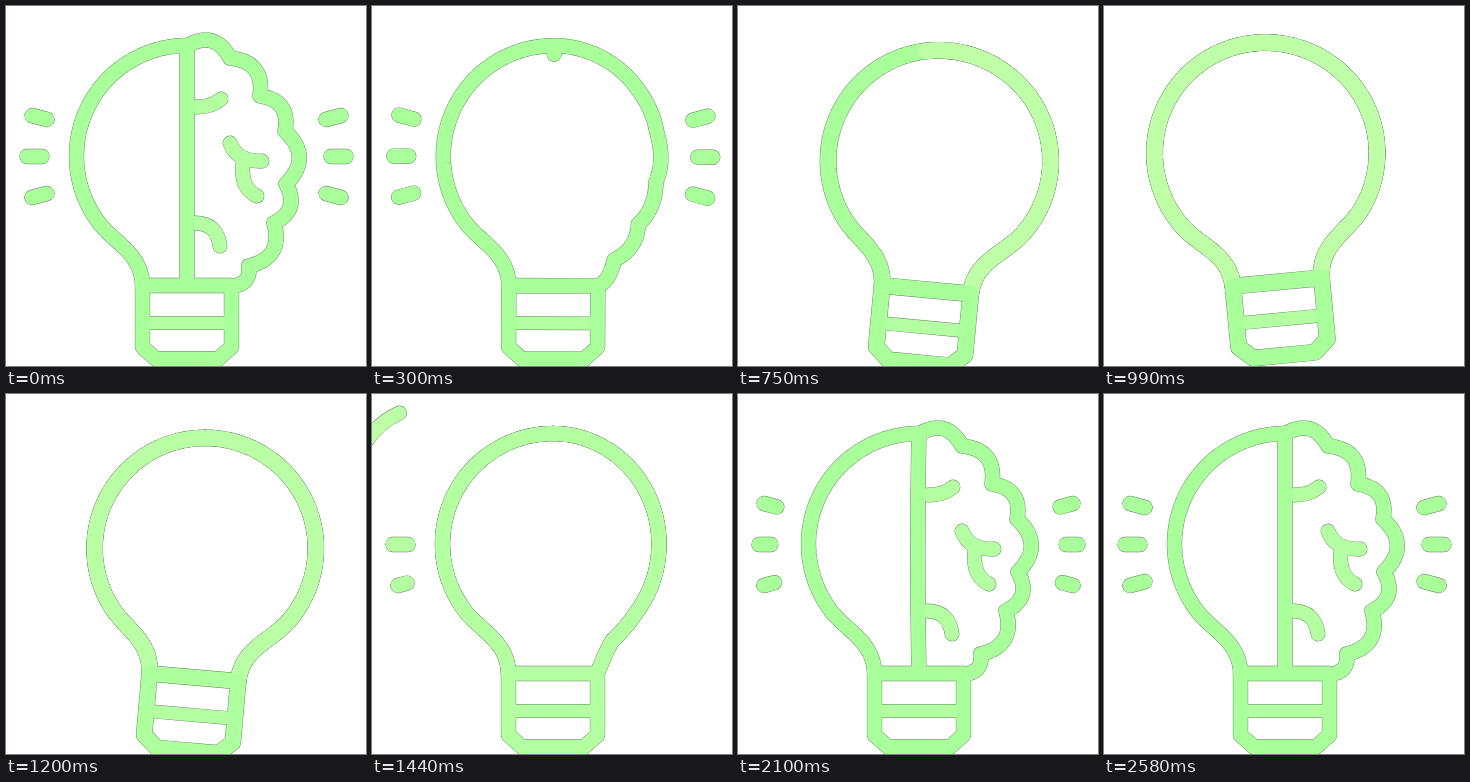
Write an HTML page with a canvas that moves like this. It is 360x360 px and loops after 2.64 s.

```html
<!DOCTYPE html>
<html lang="en">
<head>
<meta charset="utf-8">
<title>Bulb and brain</title>
<style>
html, body { margin: 0; width: 100%; height: 100%; overflow: hidden; background: #fff; }
canvas { display: block; width: 360px; height: 360px; }
</style>
</head>
<body>
<canvas id="stage" width="360" height="360"></canvas>
<script>
const ctx = document.getElementById('stage').getContext('2d');
const LOOP = 2640, STEP = 30, SAMPLES = 140;
const CX = 181, CY = 150, R = 110.5;

// Dents between the seven brain bumps.
const DENTS = [
  [181, 40], [224, 52], [254, 90], [279, 125], [280, 178], [268, 217], [243, 260], [225.5, 280]
];
// Start, control and end of the folds inside the brain.
const FOLDS = [
  [[190, 101], [206, 101], [215, 93]],
  [[256, 155], [231, 156], [224, 137]],
  [[237, 157], [234, 182], [251, 190]],
  [[189, 217], [211, 217], [214, 240]]
];

const mix = (a, b, k) => a + (b - a) * k;
const mixPt = (p, q, k) => [mix(p[0], q[0], k), mix(p[1], q[1], k)];
const ramp = (t, from, to) => Math.min(1, Math.max(0, (t - from) / (to - from)));
const smooth = k => k * k * (3 - 2 * k);
const ease = (t, from, to) => smooth(ramp(t, from, to));
const easeOut = k => 1 - (1 - k) ** 3;
const tone = k => `rgb(${mix(169, 191, k)},255,${mix(154, 168, k)})`;
const rad = deg => deg * Math.PI / 180;

// Present at first, gone after the first span, back after the second.
const shown = (t, out, outEnd, back, backEnd) =>
  t < 900 ? 1 - ease(t, out, outEnd) : ease(t, back, backEnd);

const quad = (a, b, c, k) => mixPt(mixPt(a, b, k), mixPt(b, c, k), k);
const cubic = (a, b, c, d, k) => mixPt(quad(a, b, c, k), quad(b, c, d, k), k);

function line(...pts) {
  const p = new Path2D();
  pts.forEach(pt => p.lineTo(...pt));
  return p;
}

function curve(a, b, c, k = 1) {
  const p = new Path2D();
  p.moveTo(...a);
  p.quadraticCurveTo(...mixPt(a, b, k), ...quad(a, b, c, k));
  return p;
}

function arc(x, y, r, from, to) {
  const p = new Path2D();
  p.arc(x, y, r, rad(from), rad(to));
  return p;
}

const sample = f => Array.from({ length: SAMPLES + 1 }, (_, i) => f(i / SAMPLES));

// Right half of the glass: an arc over five parts of seven, then the neck.
function dome(u, rx) {
  const onArc = deg => [CX + rx * Math.cos(rad(deg)), CY + R * Math.sin(rad(deg))];
  const k = u * 7 / 5;
  if (k <= 1) return onArc(mix(-90, 38, k));
  return cubic(onArc(38), [252, 238], [226, 248], [225.5, 280], (u * 7 - 5) / 2);
}

// Every bump bulges outwards in proportion to its width.
function brain(u) {
  const i = Math.min(6, Math.floor(u * 7));
  const a = DENTS[i], b = DENTS[i + 1], bulge = 0.52;
  const top = [
    (a[0] + b[0]) / 2 + (b[1] - a[1]) * bulge,
    (a[1] + b[1]) / 2 - (b[0] - a[0]) * bulge
  ];
  return quad(a, top, b, u * 7 - i);
}

const leftHalf = sample(u => {
  const [x, y] = dome(u, R);
  return [2 * CX - x, y];
});
const socket = line([225.5, 279.5], [136.5, 279.5], [136.5, 341], [150, 353],
  [212, 353], [225.5, 341], [225.5, 279.5]);
const thread = line([143, 317], [219, 317]);

function rayLength(t, i, left) {
  if (t < 900) return 1 - ease(t, 540, 660);
  if (t > 1780) return easeOut(ramp(t, 1830 + i * 40, 2400 + i * 40));
  const on = 1320 + (i + 2) % 3 * 60;
  return left ? ramp(t, on, on + 100) - ramp(t, on + 180, on + 280) : 0;
}

function bulb(t) {
  const list = [];
  const swell = ease(t, 300, 500) - ease(t, 1100, 1440);
  const warm = 0.5 * (ease(t, 1000, 1440) - ease(t, 1440, 1800));
  const width = 14.5 + 1.5 * swell, color = tone(warm);
  const add = (path, c = color, w = width) => list.push({ path, color: c, width: w });

  // The brain returns slightly squashed and the divider bent; both spring straight.
  const squash = t > 900 ? 1 - ease(t, 1770, 2100) : 0;
  const settle = ([x, y]) => [
    mix(x, 190, 0.06 * squash) + 3 * squash,
    mix(y, 158, 0.06 * squash)
  ];
  const bow = t > 900
    ? 22 * Math.cos(Math.max(0, t - 1770) / 75) * (1 - ramp(t, 1740, 2580)) ** 2 : 0;

  const fold = shown(t, 30, 270, 1500, 1740);
  if (fold > 0.01) FOLDS.forEach(f => add(curve(...f.map(settle), fold), tone(0.5), 14));
  add(thread, tone(0.5), 13);

  // Bumps flatten from the top and grow back from the bottom.
  const right = sample(u => {
    const k = shown(t, 60 + u * 170, 270 + u * 170, 1620 - u * 270, 1770 - u * 210);
    return mixPt(dome(u, 106 + 6 * swell), settle(brain(u)), k);
  });
  add(line(...right));
  add(line(...leftHalf));

  // A lighter tint wipes over the glass from right to left.
  const glass = [...right].reverse().concat(leftHalf);
  const tint = ramp(t, 510, 960);
  if (tint > 0 && t < 1800) {
    add(line(...glass.slice(0, Math.ceil(glass.length * tint))), tone(1 - ease(t, 1000, 1440) + warm));
  }

  const div = shown(t, 60, 330, 1530, 1740);
  if (div > 0.01) {
    add(curve([CX + bow * 0.08, 40], [CX + bow, 156], [CX + bow * 0.1, 274], div));
  }
  add(socket);

  for (let i = 0; i < 3; i++) {
    const d = i - 1, x = 21 + 5 * Math.abs(d);
    for (const left of [true, false]) {
      const k = rayLength(t, i, left);
      if (k < 0.02) continue;
      const at = (dx, dy) => [left ? x + dx : 361 - x - dx, 150.5 + dy];
      add(line(at(0, 41 * d), at(15 * k, mix(41, 37, k) * d)), color, 14.5 * Math.min(1, k * 2));
    }
  }
  return list;
}

function trails(t) {
  const list = [];
  const add = (x, y, r, from, to) => {
    if (to - from > 0.5) list.push({ path: arc(x, y, r, from, to), color: tone(0.9), width: 14 });
  };
  add(243, 50, 80, mix(60, -60, ramp(t, 330, 470)), mix(60, -60, ramp(t, 330, 630) ** 2));
  add(60, 91, 79, mix(180, 330, ramp(t, 1600, 1965)), mix(180, 330, ramp(t, 1116, 1856)));
  return list;
}

// A hairline edge lies under the coloured strokes.
function stroke(list) {
  for (const edge of [true, false]) {
    for (const s of list) {
      ctx.lineWidth = s.width + (edge ? 0.8 : 0);
      ctx.strokeStyle = edge ? '#5d7a58' : s.color;
      ctx.stroke(s.path);
    }
  }
}

function tilt(t) {
  const strength = ease(t, 270, 510) - ease(t, 1200, 1400);
  return -5.4 * strength * Math.cos(2 * Math.PI * (t - 510) / 480);
}

function draw(t) {
  ctx.setTransform(1, 0, 0, 1, 0, 0);
  ctx.fillStyle = '#fff';
  ctx.fillRect(0, 0, 360, 360);
  ctx.lineCap = ctx.lineJoin = 'round';
  stroke(trails(t));
  ctx.translate(140, 360);
  ctx.rotate(rad(tilt(t)));
  ctx.translate(-140, -360);
  stroke(bulb(t));
}

const start = performance.now();
function tick() {
  const t = (performance.now() - start) % LOOP;
  draw(Math.min(2580, Math.floor(t / STEP) * STEP));
  requestAnimationFrame(tick);
}
tick();
</script>
</body>
</html>
```
